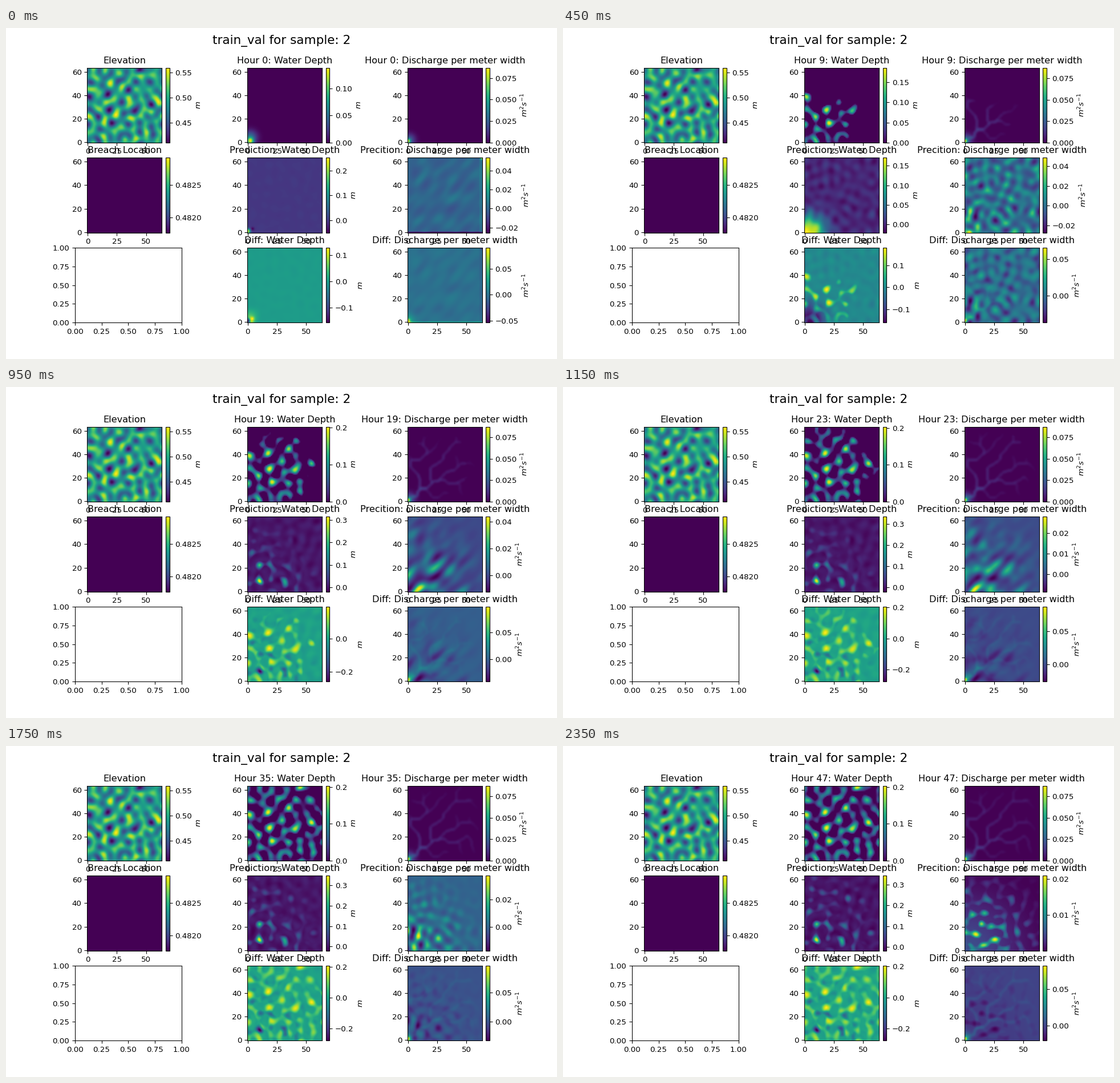
A matplotlib script for the animation above (2400 ms loop, 966 by 580 pixels).

```python
from itertools import product

import numpy as np
import matplotlib.pyplot as plt
from matplotlib.animation import FuncAnimation
from mpl_toolkits.axes_grid1 import make_axes_locatable

N, HOURS = 64, 48
Y, X = np.mgrid[0:N, 0:N].astype(float)
DIST = np.hypot(X, Y)
NEIGHBOURS = [s for s in product((-1, 0, 1), repeat=2) if any(s)]


def spot(x, y, size):
    return np.exp(-((X - x) ** 2 + (Y - y) ** 2) / (2 * size ** 2))


def pulse(t, centre, width):
    return np.exp(-((t - centre) / width) ** 2)


def noise(seed, stretch=1.0):
    """Smooth unit-variance field; stretch lengthens it along the diagonal."""
    fy, fx = np.meshgrid(np.fft.fftfreq(N), np.fft.fftfreq(N), indexing="ij")
    freq = np.hypot((fx - fy) / 2 ** 0.5, stretch * (fx + fy) / 2 ** 0.5)
    band = np.exp(-((freq - 0.09) / 0.035) ** 2)
    raw = np.random.default_rng(seed).normal(size=(N, N))
    field = np.fft.ifft2(np.fft.fft2(raw) * band).real
    return field / field.std()


def move_peak(field, x, y):
    """Roll a periodic field so that its highest point lies at x, y."""
    py, px = np.unravel_index(field.argmax(), field.shape)
    return np.roll(field, (y - py, x - px), (0, 1))


def blur(field, passes):
    for _ in range(passes):
        p = np.pad(field, 1, mode="edge")
        p = (p[:-2] + 2 * p[1:-1] + p[2:]) / 4
        field = (p[:, :-2] + 2 * p[:, 1:-1] + p[:, 2:]) / 4
    return field


def flood(cost):
    """Cheapest travel time from the corner, and each cell's way back."""
    time = np.full((N, N), np.inf)
    time[0, 0] = 0
    for _ in range(3 * N):
        p = np.pad(time, 1, constant_values=np.inf)
        routes = np.array([p[1 + dy:1 + dy + N, 1 + dx:1 + dx + N]
                           + cost * np.hypot(dx, dy) for dy, dx in NEIGHBOURS])
        time = np.minimum(time, routes.min(axis=0))
    return time, routes.argmin(axis=0)


def drainage(time, back):
    """Number of cells fed through each cell."""
    fed = np.ones((N, N))
    for i in np.argsort(-time, axis=None)[:-1]:
        y, x = divmod(i, N)
        dy, dx = NEIGHBOURS[back[y, x]]
        fed[y + dy, x + dx] += fed[y, x]
    return fed


hollow = move_peak(noise(5), 18, 27)
elevation = np.interp(-hollow, (-hollow.max(), -hollow.min()), (0.4103, 0.5595))
level = np.quantile(elevation, 0.62)

travel, back = flood(np.exp(-1.2 * hollow))
arrival = 44 * (travel / np.quantile(travel, 0.98)) ** 2
rivers = blur(np.maximum(np.sqrt(drainage(travel, back)) / N - 0.1, 0) ** 0.5, 2)
rivers *= (1 - spot(0, 0, 3)) / np.quantile(rivers, 0.99)

pools = move_peak(noise(11), 10, 9)
pools = (np.maximum(pools, 0) / pools.max()) ** 1.5
ROUND = noise(11), noise(12)
SLANT = noise(21, 2.0), noise(22, 2.0)


def drift(pair, t):
    return pair[0] * np.cos(t / 9) + pair[1] * np.sin(t / 9)


def true_depth(t):
    lag = np.exp(-np.maximum(t - arrival, 0) / 3)
    surface = level - 1.5 * elevation.std() * lag
    pool = 0.2035 * np.maximum(surface - elevation, 0) / (level - elevation.min())
    start = np.exp(-t / 3) * (0.10 * spot(2, 1, 2) + 0.05 * spot(2, 4, 4))
    return np.maximum(pool * (t > arrival), start)


def true_flow(t):
    front = np.clip((t - arrival) / 4, 0, 1)
    inlet = 0.064 * spot(0, 1, 1.3) + 0.025 * spot(1, 2, 3.5)
    return inlet + 0.008 * rivers * front


def guess_depth(t):
    late = 1 - np.exp(-max(t - 9, 0) / 4)
    reach = np.exp(-(DIST / (38 + 0.4 * t)) ** 4)
    out = 0.345 * late * pools * reach
    out += (0.001 + 0.005 * min(t / 9, 1)) * drift(ROUND, t)
    out += np.exp(-t / 2) * (0.25 * spot(0, 1, 1.4) - 0.05 * spot(4, 3, 1))
    return out + 0.17 * pulse(t, 9, 4) * spot(4, 1, 9)


def guess_flow(t):
    slant = pulse(t, 19, 9) if t > 4 else np.exp(-t / 2)
    grain = slant * drift(SLANT, t) + (1 - slant) * drift(ROUND, t + 4)
    grain *= np.where(grain > 0, 1.4, 1 - (t / 47) ** 8)
    fade = np.exp(-(DIST / (42 + 160 * pulse(t, 5, 6))) ** 2)
    size = 0.002 + 0.01 * (1 - np.exp(-t / 4)) * np.exp(-max(t - 9, 0) / 60)
    out = size * grain * fade + 0.005 * fade * np.clip((t - 9) / 8, 0, 1)
    out += 0.055 * pulse(t, 9, 4) * spot(4, 0, 2)
    edge = 0.004 * (X > 60) - 0.022 * (Y < 1) + 0.05 * spot(63, 63, 1)
    return out + np.exp(-t / 2) * edge


# Text is sized for a 10 inch wide figure
fig, axes = plt.subplots(3, 3, figsize=(10, 6.00415), dpi=96.6)
fig.subplots_adjust(left=0.125, right=0.9, bottom=0.11, top=0.88,
                    wspace=0.5, hspace=0.2)
fig.suptitle("train_val for sample: 2", fontsize=16)


def panel(ax, title, label, data, lo=0, hi=1):
    im = ax.imshow(data, origin="lower", cmap="viridis", vmin=lo, vmax=hi)
    ax.set_title(title)
    cax = make_axes_locatable(ax).append_axes("right", size="5%", pad="5%")
    fig.colorbar(im, cax=cax, label=label)
    return im


DEPTH_UNIT, FLOW_UNIT = "$m$", "$m^2s^{-1}$"
blank = np.zeros((N, N))
panel(axes[0, 0], "Elevation", DEPTH_UNIT, elevation, 0.4103, 0.5595)
panel(axes[1, 0], "Breach Location", "", blank, 0.48176, 0.48293)

images = []
for row, prefix in enumerate(("Hour 0", "Prediction", "Diff")):
    flow_prefix = "Precition" if prefix == "Prediction" else prefix
    images.append(panel(axes[row, 1], f"{prefix}: Water Depth",
                        DEPTH_UNIT, blank))
    images.append(panel(axes[row, 2], f"{flow_prefix}: Discharge per meter width",
                        FLOW_UNIT, blank))


def update(hour):
    truth = [true_depth(hour), true_flow(hour)]
    guess = [guess_depth(hour), guess_flow(hour)]
    diff = [a - b for a, b in zip(truth, guess)]
    for im, data in zip(images, truth + guess + diff):
        im.set_data(data)
        im.set_clim(data.min(), data.max())
    axes[0, 1].set_title(f"Hour {hour}: Water Depth")
    axes[0, 2].set_title(f"Hour {hour}: Discharge per meter width")
    return images


anim = FuncAnimation(fig, update, frames=HOURS, interval=50, repeat=True)
plt.show()
```
